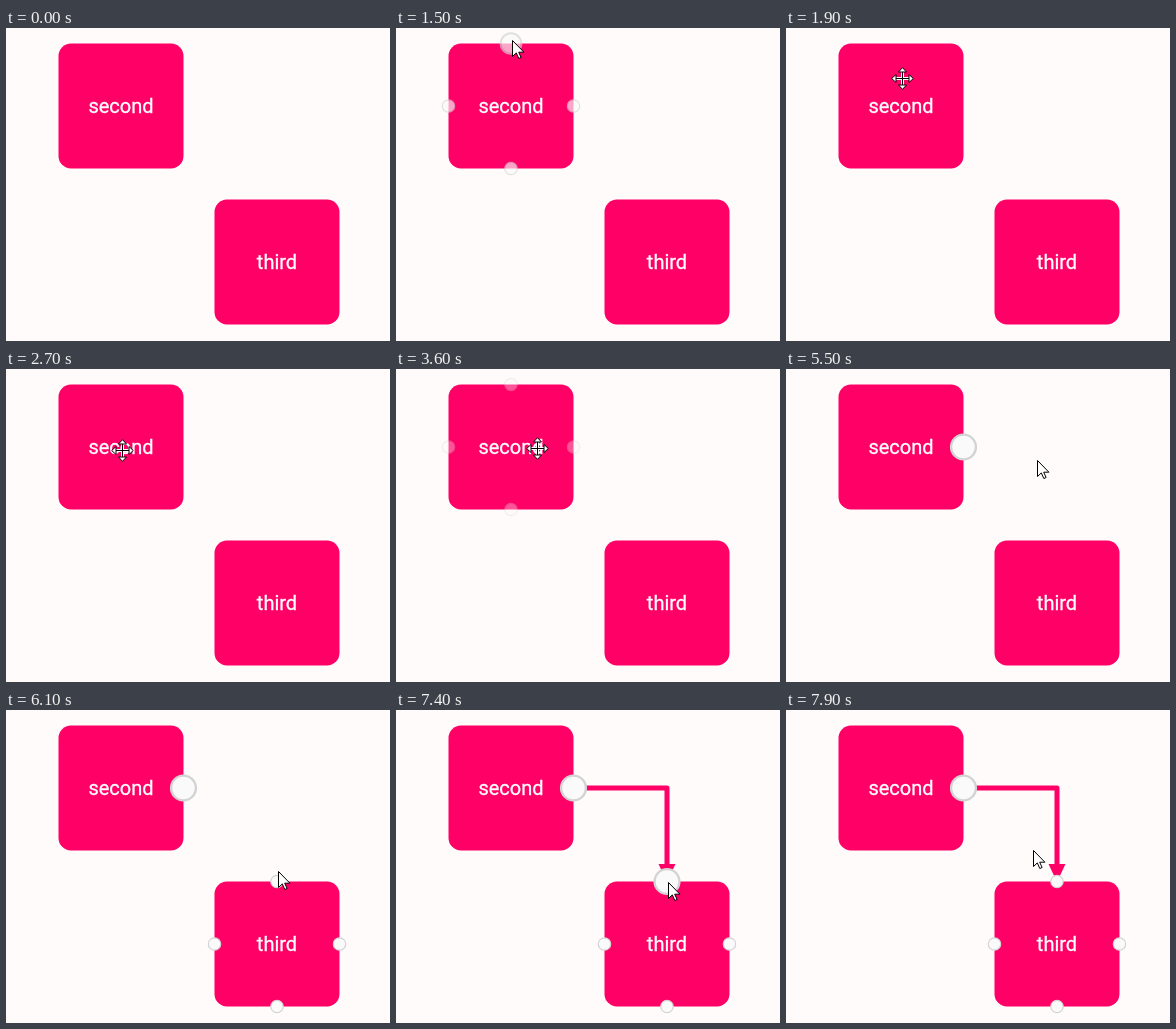
An HTML page for the animation above (8 s loop, 384 by 313 pixels).

```html
<!DOCTYPE html>
<html lang="en">
<head>
<meta charset="utf-8">
<title>Connecting two boxes</title>
<style>
  html, body { margin: 0; width: 100%; height: 100%; overflow: hidden; background: #fffbfa; }
  svg { display: block; }
  text { font: 20px Roboto, sans-serif; fill: #fff; stroke: #fff; stroke-width: .3; text-anchor: middle; }
  .pink { fill: #ff0066; }
  .port { fill: #fafafa; stroke: #d3d3d3; }
  .cursor { fill: #fff; stroke: #000; }
</style>
</head>
<body>
<svg width="384" height="313" viewBox="0 0 384 313">
  <g id="link">
    <path d="M177 78H271V158" fill="none" stroke="#ff0066" stroke-width="5" stroke-linejoin="round"/>
    <path class="pink" d="M262.5 154H279.5L271 172Z"/>
  </g>
  <g id="boxes"></g>
  <g id="ports"></g>
  <path id="arrow" class="cursor" d="M.5 .5V16.5L4.3 12.9 6.8 18.5 9.1 17.5 6.7 12.2H11.9Z"/>
  <g id="move" class="cursor">
    <path d="M-7 0H7M0 -7V7" stroke="#fff" stroke-width="3"/>
    <path d="M-7 0H7M0 -7V7"/>
  </g>
</svg>
<script>
const LOOP = 8000, STEP = 100, FADE = 300;
const SIDE = 125, HALF = SIDE / 2;
const $ = id => document.getElementById(id);

function add(parent, tag, attrs) {
  const el = document.createElementNS("http://www.w3.org/2000/svg", tag);
  for (const key in attrs) el.setAttribute(key, attrs[key]);
  return parent.appendChild(el);
}

const ramp = (t, from, to) => Math.min(1, Math.max(0, (t - from) / (to - from)));
const smooth = p => p * p * (3 - 2 * p);
const easeOut = p => 1 - (1 - p) ** 2;

// Fades in from one time and out from another
const pulse = (t, on, off = Infinity) =>
  ramp(t, on, on + FADE) - (off < LOOP ? ramp(t, off, off + FADE) : 0);

const bezier = (u, a, b, c, d) =>
  (1 - u) ** 3 * a + 3 * u * (1 - u) ** 2 * b + 3 * u * u * (1 - u) * c + u ** 3 * d;

const hover = t => pulse(t, 1300, 1600);
const showFirst = t => hover(t) + pulse(t, 3500, 5000);
const showSource = t => hover(t) + pulse(t, 3500);
const showSecond = t => pulse(t, 5800);
const growSource = t => pulse(t, 3700);
const growTarget = t => pulse(t, 6100, 7500);
const still = () => 0;

const ports = [];

// A labelled square with a port in the middle of each side
function addBox(x, y, label, show, grow, showRight, growRight) {
  const cx = x + HALF, cy = y + HALF;
  add($("boxes"), "rect", { class: "pink", x, y, width: SIDE, height: SIDE, rx: 12.5 });
  add($("boxes"), "text", { x: cx, y: Math.round(cy) + 7 }).textContent = label;
  const port = (px, py, show, grow) =>
    ports.push({ el: add($("ports"), "circle", { class: "port", cx: px, cy: py }), show, grow });
  port(cx, y, show, grow);
  port(x, cy, show, still);
  port(cx, y + SIDE, show, still);
  port(x + SIDE, cy, showRight, growRight);
}

addBox(52.5, 15.5, "second", showFirst, hover, showSource, growSource);
addBox(208.5, 171.5, "third", showSecond, growTarget, showSecond, still);

for (let turn = 0; turn < 360; turn += 90) {
  add($("move"), "path", { d: "M-4 -6.5L0 -10.8 4 -6.5Z", transform: `rotate(${turn})` });
}

// Cursor: enter the box, go to its right port, drag to the other box, leave
function cursorAt(t) {
  if (t < 3200) {
    const p = easeOut(ramp(t, 1400, 2700));
    return [116, 81 * p];
  }
  if (t < 4900) {
    const p = smooth(ramp(t, 3200, 4100));
    return [116 + 61 * p, 81 - 4 * p];
  }
  const u = smooth(ramp(t, 4900, 6300)), out = ramp(t, 7600, 7900);
  return [bezier(u, 177, 273, 272, 272) - 25 * out, bezier(u, 77, 77, 106, 172) - 32 * out];
}

function toggle(el, on) {
  el.setAttribute("visibility", on ? "visible" : "hidden");
}

function draw(ms) {
  const t = Math.floor(ms % LOOP / STEP) * STEP;
  for (const { el, show, grow } of ports) {
    const size = 1 + grow(t);
    el.setAttribute("opacity", show(t));
    el.setAttribute("r", 6.2 * size);
    el.setAttribute("stroke-width", 1.2 * size);
  }
  const [x, y] = cursorAt(t).map(Math.round);
  const moving = t >= 1800 && t < 3900;
  $("arrow").setAttribute("transform", `translate(${x} ${y})`);
  $("move").setAttribute("transform", `translate(${x + .5} ${y + .5})`);
  toggle($("move"), moving);
  toggle($("arrow"), t >= 1400 && !moving);
  toggle($("link"), t >= 7400);
}

const start = performance.now();
function tick() {
  draw(performance.now() - start);
  requestAnimationFrame(tick);
}
tick();
</script>
</body>
</html>
```
